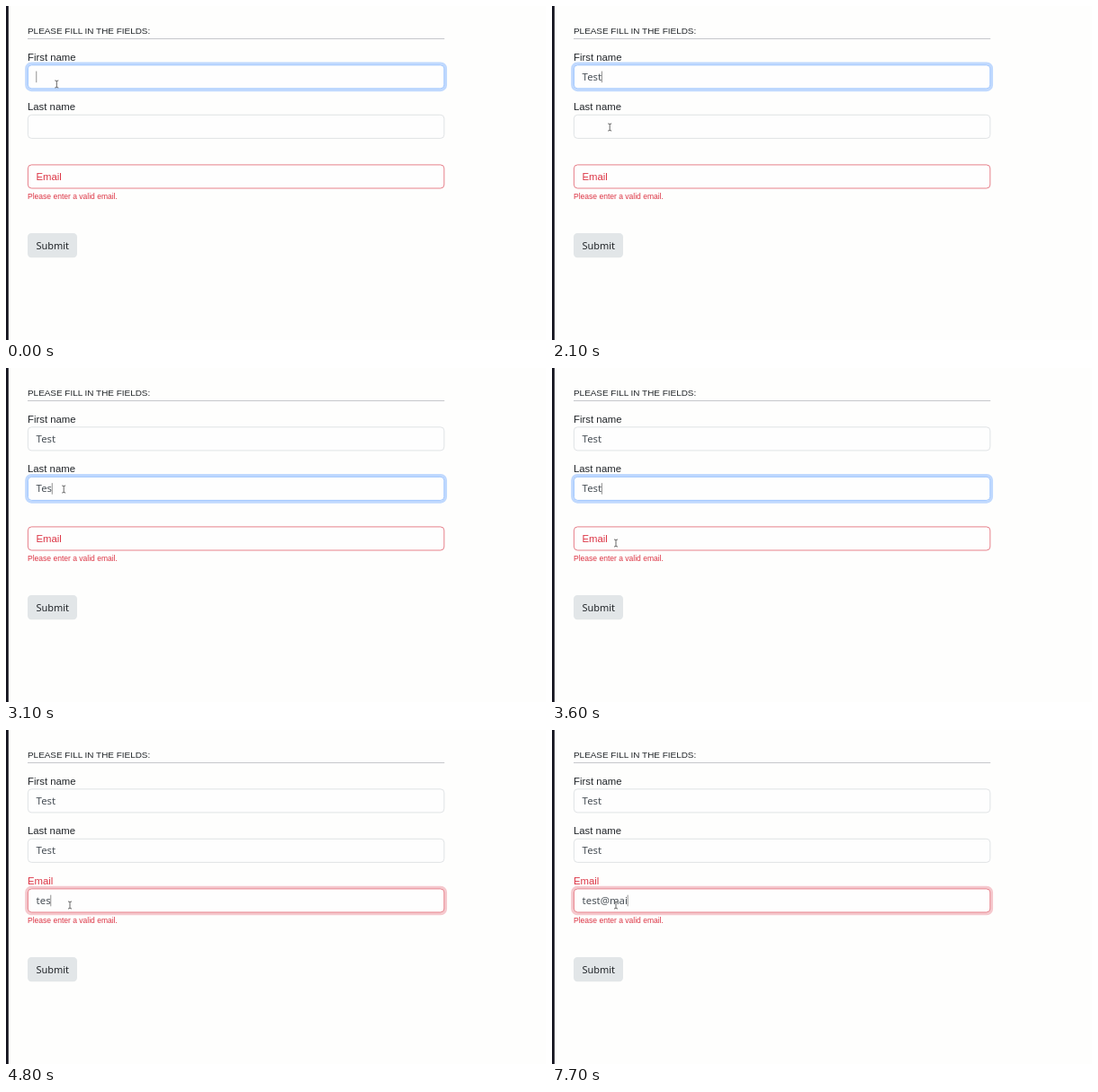
These frames come from a looping animation (600 px wide and 372 px high, 8000 ms). An HTML page:

```html
<!DOCTYPE html>
<html lang="en">
<head>
<meta charset="utf-8">
<title>Form</title>
<style>
html, body { margin: 0; width: 100%; height: 100%; overflow: hidden; background: #fefefd; }
svg { display: block; width: 600px; height: 372px; }
text { font: 11.35px "Liberation Sans", Arial, sans-serif; fill: #212529; white-space: pre; }
.title { font-size: 9.93px; }
.error { font-size: 8.53px; }
.red, .error { fill: #dc3545; }
.value { font: 11.4px "Noto Sans", "Open Sans", sans-serif; fill: #495057; }
.submit { font: 11px "Noto Sans", "Open Sans", sans-serif; }
.box { fill: #fff; fill-opacity: .6; stroke-width: .8; }
.glow { fill: none; stroke-width: 2.9; }
</style>
</head>
<body>
<svg viewBox="0 0 600 372">
  <rect width="600" height="372" fill="#fefefd"/>
  <rect width="2.8" height="372" fill="#14141f"/>
  <text class="title" x="24" y="31.3">PLEASE FILL IN THE FIELDS:</text>
  <rect x="24" y="36" width="463.2" height="1" fill="#c6c7cb"/>
  <text x="24" y="60.8">First name</text>
  <text x="24" y="116.3">Last name</text>
  <g id="fields"></g>
  <text class="red" id="label">Email</text>
  <text class="error" x="24" y="215.2">Please enter a valid email.</text>
  <rect x="24" y="253" width="55" height="27.3" rx="4.2" fill="#e2e6e8"/>
  <text class="submit" x="33.4" y="270.6">Submit</text>
  <path id="mouse" d="M-2-4Q0-4 0-3Q0-4 2-4M0-3.4V3.4M-2 4Q0 4 0 3Q0 4 2 4" fill="none" stroke="#555" stroke-width=".9"/>
</svg>
<script>
const LOOP = 8000, STEP = 100, LEFT = 33.6;
const $ = id => document.getElementById(id);

function add(parent, tag, attrs) {
  const el = document.createElementNS("http://www.w3.org/2000/svg", tag);
  for (const k in attrs) el.setAttribute(k, attrs[k]);
  return parent.appendChild(el);
}

// keys: times at which each character of text arrives
const specs = [
  { y: 65.4, from: 0, to: 2200, text: "Test", keys: [1200, 1400, 1700, 1900], off: [[400, 1000]] },
  { y: 120.9, from: 2200, to: 3700, text: "Test", keys: [2700, 2900, 3100, 3300], off: [] },
  { y: 176.5, from: 3700, to: LOOP, text: "test@mai", bad: true,
    keys: [4100, 4200, 4800, 5100, 6100, 7300, 7500, 7700], off: [[5700, 6100], [6700, 7300]] }
];

const fields = specs.map(s => {
  const g = $("fields"), y = s.y;
  return {
    ...s,
    glow: add(g, "rect", { class: "glow", x: 22.6, y: y - 1.4, width: 466, height: 29.7, rx: 5.6,
      stroke: s.bad ? "#f5c8cd" : "#c0d9fe" }),
    box: add(g, "rect", { class: "box", x: 24.4, y: y + .4, width: 462.4, height: 26.1, rx: 4 }),
    value: add(g, "text", { class: "value", x: LEFT, y: y + 17.4 }),
    caret: add(g, "rect", { y: y + 7.2, width: .8, height: 12.6, fill: "#777" })
  };
});

const inside = (t, [a, b]) => t >= a && t < b;
const show = (el, on) => el.setAttribute("visibility", on ? "visible" : "hidden");

function drawField(f, t) {
  const focus = inside(t, [f.from, f.to]);
  const text = f.text.slice(0, f.keys.filter(k => t >= k).length);
  if (f.value.textContent !== text) f.value.textContent = text;
  show(f.glow, focus);
  f.box.setAttribute("stroke", f.bad ? "#e0606c" : focus ? "#86b7fe" : "#d9dcdf");
  show(f.caret, focus && !f.off.some(r => inside(t, r)));
  f.caret.setAttribute("x", LEFT - .2 + (text ? f.value.getComputedTextLength() : 0));
}

// [time, x, y]
const path = [
  [0, 56.3, 87], [1700, 56.3, 87], [1800, 57.5, 93], [1900, 60.5, 112], [2000, 63.5, 130],
  [2100, 64.2, 135], [3300, 64.2, 135], [3400, 68, 172], [3500, 71, 204], [3600, 71, 195], [LOOP, 71, 195]
];

function mouseAt(t) {
  const i = path.findIndex(p => p[0] > t), a = path[i - 1], b = path[i];
  const k = (t - a[0]) / (b[0] - a[0]);
  return [1, 2].map(n => a[n] + (b[n] - a[n]) * k);
}

const floatAt = t => t < 3700 ? 0 : t < 3800 ? .5 : t < 3900 ? .95 : 1;

function draw(ms) {
  const t = Math.floor(ms % LOOP / STEP) * STEP;
  fields.forEach(f => drawField(f, t));
  const k = floatAt(t);
  $("label").setAttribute("x", 33.4 - 9.4 * k);
  $("label").setAttribute("y", 193.9 - 22.1 * k);
  $("mouse").setAttribute("transform", `translate(${mouseAt(t)})`);
}

const start = performance.now();
function tick() {
  draw(performance.now() - start);
  requestAnimationFrame(tick);
}
tick();
</script>
</body>
</html>
```
